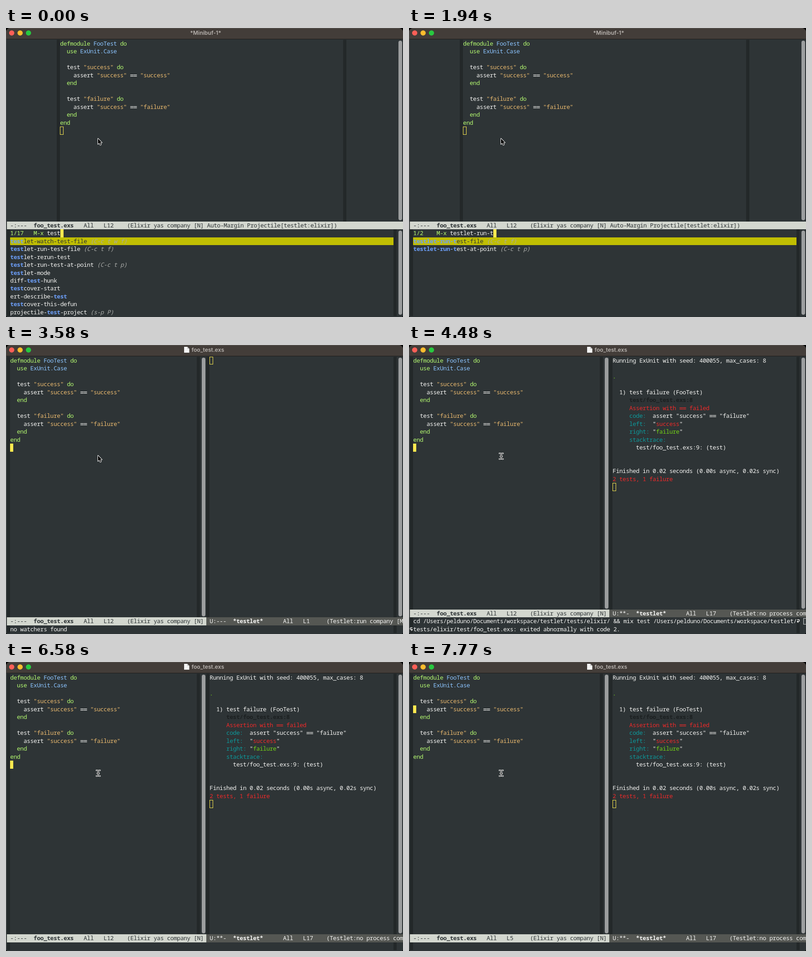
An HTML page with a canvas that plays this animation: 876 by 639 pixels, repeating every 8 s.

```html
<!DOCTYPE html>
<html lang="en">
<head>
<meta charset="utf-8">
<title>Editor test run</title>
<style>
  html, body { margin: 0; width: 100%; height: 100%; overflow: hidden; background: #000; }
  canvas { display: block; }
</style>
</head>
<body>
<canvas id="stage" width="876" height="639"></canvas>
<script>
const ctx = document.getElementById('stage').getContext('2d');
const LOOP = 8000, CW = 7.36, LH = 17.47, TOP = 25.9;
const C = {
  bg: '#2e3436', fringe: '#232829', text: '#f4f4f2', key: '#b4fa70', type: '#8cc4ff',
  str: '#e9b96e', match: '#6c9ef8', hint: '#a9aba8', row: '#c0be02', cursor: '#fce94f',
  mode: '#d3d7cf', modeOff: '#555753', thumb: '#9c9e9f',
  red: '#ee2a2a', teal: '#0d999b', green: '#73d216', dim: '#1c2021'
};

const code = `defmodule FooTest do
  use ExUnit.Case

  test "success" do
    assert "success" == "success"
  end

  test "failure" do
    assert "success" == "failure"
  end
end`.split('\n');

// [row, column, text, colour, weight]
const output = [
  [0, 0, 'Running ExUnit with seed: 400055, max_cases: 8'],
  [2, 0, '.', C.green],
  [4, 2, '1) test failure (FooTest)'],
  [5, 5, 'test/foo_test.exs:8', C.dim, 'bold'],
  [6, 5, 'Assertion with == failed', C.red],
  [7, 5, 'code:', C.teal], [7, 12, 'assert "success" == "failure"'],
  [8, 5, 'left:', C.teal], [8, 12, '"       "'], [8, 13, 'success', C.red],
  [9, 5, 'right:', C.teal], [9, 12, '"       "'], [9, 13, 'failure', C.green],
  [10, 5, 'stacktrace:', C.teal],
  [11, 7, 'test/foo_test.exs:9: (test)'],
  [14, 0, 'Finished in 0.02 seconds (0.00s async, 0.02s sync)'],
  [15, 0, '2 tests, 1 failure', C.red]
];

const commands = [
  ['testlet-watch-test-file', '(C-c t w f)'],
  ['testlet-run-test-file', '(C-c t f)'],
  ['testlet-rerun-test'],
  ['testlet-run-test-at-point', '(C-c t p)'],
  ['testlet-mode'],
  ['diff-test-hunk'],
  ['testcover-start'],
  ['ert-describe-test'],
  ['testcover-this-defun'],
  ['projectile-test-project', '(s-p P)'],
  ['testlet-remove-all-watchers', '(C-c t w r)']
];

// time -> number of typed characters
const typed = 'testlet-run-test-file';
const typing = [[0, 4], [450, 5], [590, 7], [890, 8], [1490, 9], [1640, 10], [1790, 11], [1940, 13],
  [2090, 14], [2240, 15], [2390, 16], [2540, 17], [2690, 19], [2980, 21]];
// time -> line of the cursor
const moves = [[0, 12], [6730, 11], [6880, 10], [7030, 9], [7180, 8], [7320, 7], [7470, 6], [7770, 5]];

const at = (steps, t) => steps.filter(s => s[0] <= t).pop()[1];
const rowY = r => Math.round(TOP + r * LH);
const rowH = r => rowY(r + 1) - rowY(r);

function rect(x, y, w, h, color) {
  ctx.fillStyle = color;
  ctx.fillRect(x, y, w, h);
}

function box(x, y, w, h, color) {
  ctx.strokeStyle = color;
  ctx.lineWidth = 1;
  ctx.strokeRect(x + .5, y + .5, w - 1, h - 1);
}

function pill(x, y, w, h, color) {
  ctx.fillStyle = color;
  ctx.beginPath();
  ctx.roundRect(x, y, w, h, w / 2);
  ctx.fill();
}

// Monospace text on the character grid; equals signs join up.
function text(x0, row, col, str, color = C.text, style = '500') {
  ctx.font = `${style} 13px "Noto Sans Mono", "DejaVu Sans Mono", monospace`;
  ctx.fillStyle = color;
  ctx.textAlign = 'center';
  const y = rowY(row) + 13;
  [...str].forEach((ch, i) => {
    const x = x0 + (col + i) * CW;
    if (ch === '=') {
      ctx.fillRect(x + .2, y - 6, CW - .2, 1.2);
      ctx.fillRect(x + .2, y - 3, CW - .2, 1.2);
    } else if (ch !== ' ') ctx.fillText(ch, x + CW / 2, y);
  });
}

function cursor(x0, row, col, solid) {
  const x = Math.round(x0 + col * CW - .3);
  if (solid) rect(x, rowY(row), 7, rowH(row), C.cursor);
  else box(x, rowY(row), 8, rowH(row), C.cursor);
}

function drawCode(x0) {
  code.forEach((line, row) => {
    let col = 0;
    for (const part of line.split(/("[^"]*"|\b(?:defmodule|use|do|end)\b|[A-Z][\w.]*)/)) {
      const color = part[0] === '"' ? C.str : /^[A-Z]/.test(part) ? C.type
        : /^(defmodule|use|do|end)$/.test(part) ? C.key : C.text;
      text(x0, row, col, part, color);
      col += part.length;
    }
  });
}

function modeLine(x, w, row, state, name, line, modes, active) {
  const color = active ? C.bg : C.text, x0 = x + 7.5, y = rowY(row), h = rowH(row);
  ctx.save();
  ctx.beginPath();
  ctx.rect(x, y, w, h);
  ctx.clip();
  rect(x, y, w, h, active ? C.mode : C.modeOff);
  text(x0, row, 0, state, color);
  text(x0, row, 7, name, color, 'bold');
  text(x0, row, 22, 'All   L' + line, color);
  text(x0, row, 35, modes, color);
  ctx.restore();
}

function titleBar(title, icon) {
  rect(0, 0, 876, 24, '#433d39');
  rect(0, 24, 876, 1, '#1d1c1b');
  ['#fe5f57', '#febc2e', '#28c840'].forEach((c, i) => pill(6.8 + i * 18.5, 5.2, 11.6, 11.6, c));
  ctx.font = '600 12.2px Inter, sans-serif';
  ctx.textAlign = icon ? 'left' : 'center';
  ctx.textRendering = 'optimizeSpeed';
  ctx.fillStyle = '#b8b3af';
  ctx.fillText(title, icon ? 409.5 : 440.5, 15);
  ctx.textRendering = 'auto';
  if (!icon) return;
  ctx.fillStyle = '#f4f4f4';
  ctx.fill(new Path2D('M393 4h7l4.5 4.5V17h-11.5z'));
  ctx.fillStyle = '#c4c4c4';
  ctx.fill(new Path2D('M400 4l4.5 4.5h-4.5z'));
}

function pointer(beam) {
  const p = new Path2D(beam
    ? 'M199.5 239.5q4 0 4 2v8.5q0 2-4 2M207.5 239.5q-4 0-4 2v8.5q0 2 4 2M201.5 246h4'
    : 'M203 244.5v12.2l2.8-2.6 2 4.6 2-.9-2-4.4h3.8z');
  ctx.lineJoin = ctx.lineCap = 'round';
  ctx.strokeStyle = '#fff';
  ctx.lineWidth = beam ? 3 : 2;
  ctx.stroke(p);
  ctx.fillStyle = ctx.strokeStyle = '#000';
  ctx.lineWidth = 1;
  if (beam) ctx.stroke(p);
  else ctx.fill(p);
}

function wrapMark(x, y, flip) {
  ctx.save();
  ctx.translate(x, y);
  if (flip) ctx.scale(-1, 1);
  ctx.strokeStyle = C.text;
  ctx.lineWidth = 1.3;
  ctx.stroke(new Path2D('M-2.5-3h2.5q2.5 0 2.5 2.3t-2.5 2.3h-2M0-.8l-2.5 2.4 2.5 2.4'));
  ctx.restore();
}

function promptView(t) {
  const input = typed.slice(0, at(typing, t));
  const found = commands.filter(c => c[0].includes(input));
  const count = input === 'test' ? 17 : found.length;
  titleBar('*Minibuf-1*');
  rect(112, 26, 7, 402, C.fringe);
  rect(744, 26, 7, 402, C.fringe);
  pill(866, 28, 8, 397, C.thumb);
  drawCode(119.5);
  cursor(119.5, 11, 0, false);
  modeLine(2, 874, 23, '-:---', 'foo_test.exs', 12,
    '(Elixir yas company [N] Auto-Margin Projectile[testlet:elixir])', true);

  rect(2, 445, 7, 192, C.fringe);
  rect(855, 445, 7, 192, C.fringe);
  pill(866, 448, 8, 186, C.thumb);
  text(9.5, 24, 0, ('1/' + count).padEnd(7) + 'M-x', C.key);
  text(9.5, 24, 11, input);
  cursor(9.5, 24, 11 + input.length, true);
  rect(9, rowY(25), 846, rowH(25), C.row);
  found.slice(0, 10).forEach(([name, keys], i) => {
    const row = 25 + i, start = name.indexOf(input), end = start + input.length;
    const color = i ? C.text : C.bg;
    text(9.5, row, 0, name.slice(0, start), color);
    text(9.5, row, start, input, C.match, 'bold');
    text(9.5, row, end, name.slice(end), color);
    if (keys) text(9.5, row, name.length + 1, keys, C.hint, 'italic');
  });
}

function echoArea(t) {
  if (t < 4480) return text(9.5, 34, 0, 'no watchers found');
  if (t >= 6580) return;
  if (t < 5680) {
    const root = '/Users/pelduno/Documents/workspace/testlet/';
    text(9.5, 33, 0, `cd ${root}tests/elixir/ && mix test ${root}`);
    text(9.5, 34, 0, 'tests/elixir/test/foo_test.exs: exited abnormally with code 2.');
    wrapMark(5, 628, true);
  } else {
    text(9.5, 33, 0, 'You can run the command ‘testlet-run-test-file’ with ');
    rect(399, 603, 52, 16, '#262c2e');
    box(399, 603, 52, 16, '#6b7072');
    text(9.5, 33, 53, 'C-c t f', '#a5c5dc');
  }
  wrapMark(859, 610, false);
  rect(870, 604, 6, 14, '#3b4143');
  box(870, 604, 8, 14, '#d0d2d2');
}

function splitView(t) {
  const ran = t >= 4480, started = t >= 4330;
  const modeRow = ran && t < 6580 ? 32 : 33, end = rowY(modeRow), echo = rowY(modeRow + 1);
  const line = at(moves, t);
  titleBar('foo_test.exs', true);
  for (const x of [2, 421, 442, 855]) rect(x, 26, 7, end - 26, C.fringe);
  for (const x of [2, 855]) rect(x, echo, 7, 637 - echo, C.fringe);
  pill(432, 28, 8, end - 30, C.thumb);
  pill(866, 28, 8, end - 30, C.thumb);

  drawCode(9.5);
  cursor(9.5, line - 1, 0, true);
  const under = (code[line - 1] || '')[0];
  if (under) text(9.5, line - 1, 0, under, C.bg);

  if (started) output.slice(0, ran ? output.length : 1).forEach(o => text(449.5, ...o));
  const outLine = ran ? 17 : started ? 3 : 1;
  cursor(449.5, outLine - 1, 0, false);

  modeLine(2, 440, modeRow, '-:---', 'foo_test.exs', line, '(Elixir yas company [N]', true);
  modeLine(442, 434, modeRow, started ? 'U:**-' : 'U:---', '*testlet*', outLine,
    ran ? '(Testlet:no process company' : '(Testlet:run company [M]', false);
  echoArea(t);
}

function frame(now) {
  const t = now % LOOP;
  rect(0, 0, 876, 639, '#000');
  ctx.save();
  ctx.beginPath();
  ctx.roundRect(0, 0, 876, 639, [9, 9, 4, 4]);
  ctx.clip();
  rect(0, 0, 876, 639, C.bg);
  if (t < 3580) promptView(t);
  else splitView(t);
  pointer(t >= 4330);
  rect(0, 0, 1, 639, '#4c4f50');
  rect(0, 0, 876, 1, '#5c5753');
  ctx.restore();
  requestAnimationFrame(frame);
}
requestAnimationFrame(frame);
</script>
</body>
</html>
```
